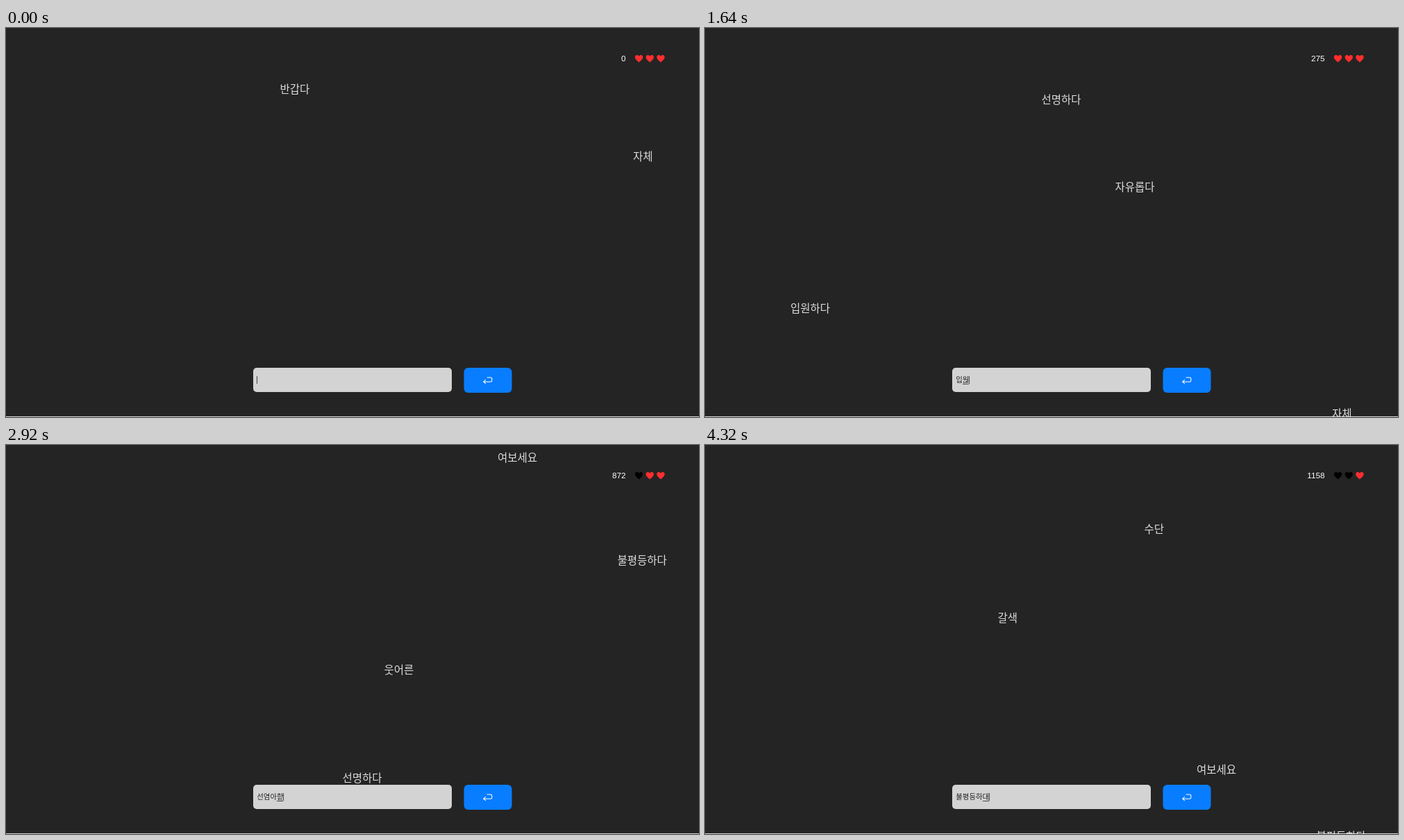
These frames come from a looping animation (998x561 px, 4340 ms). An HTML page with a canvas:

```html
<!DOCTYPE html>
<html lang="ko">
<head>
<meta charset="utf-8">
<title>Falling words</title>
<style>
html, body { margin: 0; width: 100%; height: 100%; overflow: hidden; background: #242424; }
canvas { display: block; width: 998px; height: 561px; }
</style>
</head>
<body>
<canvas id="stage"></canvas>
<script>
const W = 998, H = 561, LOOP = 4340;
const KOREAN = '"Noto Sans CJK KR", "Noto Sans CJK", "Noto Sans KR", sans-serif';
const canvas = document.getElementById('stage');
const ratio = window.devicePixelRatio || 1;
canvas.width = W * ratio;
canvas.height = H * ratio;
const ctx = canvas.getContext('2d');
ctx.scale(ratio, ratio);

// y is the middle of the word at time t, speed in px per ms
const words = [
  { text: '반갑다', x: 394.5, t: 0, y: 88, speed: 0.294, end: 1240 },
  { text: '자체', x: 903, t: 0, y: 185, speed: 0.2262 },
  { text: '입원하다', x: 123, t: 1000, y: 222, speed: 0.2844, end: 1820 },
  { text: '자유롭다', x: 590.5, t: 1000, y: 61, speed: 0.263, end: 2440 },
  { text: '선명하다', x: 484.5, t: 1640, y: 102.5, speed: 0.295 },
  { text: '웃어른', x: 544.5, t: 2360, y: 161, speed: 0.291, end: 3640 },
  { text: '불평등하다', x: 880.5, t: 2360, y: 7, speed: 0.284 },
  { text: '여보세요', x: 708, t: 2920, y: 18, speed: 0.3215 },
  { text: '갈색', x: 421.5, t: 3700, y: 82, speed: 0.2693 },
  { text: '수단', x: 632.5, t: 4320, y: 121, speed: 0.28 }
];

// each entry: first key, time per key, time of Enter, text after each key
const typing = [
  [840, 50, 1240, 'ㅂ 바 반 반ㄱ 반가 반갑 반갑ㄷ 반갑다'],
  [1285, 48, 1820, 'ㅇ 이 입 입ㅇ 입우 입워 입원 입웒 입원하 입원핟 입원하다'],
  [1990, 50, 2440, 'ㅈ 자 장 자유 자율 자유로 자유롭 자유롭ㄷ 자유롭다'],
  [2475, 43, 3000, 'ㅅ 서 선 선ㅇ 선여 선염 선염ㅇ 선염아 선염앟 선염아하 선염아핟 선염아하다'],
  [3220, 50, 3640, 'ㅇ 우 웃 웃ㅇ 웃어 웃얼 웃어르 웃어른'],
  [3750, 45, LOOP, 'ㅂ 부 불 붍 불펴 불평 불평ㄷ 불평드 불평등 불평등ㅎ 불평등하 불평등핟 불평등하대']
].map(([start, step, end, keys]) => ({ start, step, end, keys: keys.split(' ') }));

const scores = [[3640, 1158], [2440, 872], [1820, 572], [1240, 275], [0, 0]];
const losses = [1707, 3228];

function box(x, y, w, h, r, color) {
  ctx.fillStyle = color;
  ctx.beginPath();
  ctx.roundRect(x, y, w, h, r);
  ctx.fill();
}

function label(text, x, y, font, color, align = 'left') {
  ctx.font = font;
  ctx.fillStyle = color;
  ctx.textAlign = align;
  ctx.fillText(text, x, y);
}

function heart(x, y, color) {
  ctx.fillStyle = color;
  ctx.beginPath();
  ctx.moveTo(x, y + 5.4);
  for (const s of [-1, 1]) {
    ctx.moveTo(x, y + 5.4);
    ctx.bezierCurveTo(x + s * 3.2, y + 2.8, x + s * 5.7, y + 0.8, x + s * 5.7, y - 1.8);
    ctx.bezierCurveTo(x + s * 5.7, y - 5.4, x + s * 1.8, y - 6, x, y - 3.4);
    ctx.closePath();
  }
  ctx.fill();
}

function drawWords(t) {
  for (const w of words) {
    const y = w.y + (t - w.t) * w.speed;
    if (y < -12 || y > 572 || t >= w.end) continue;
    label(w.text, w.x, y + 6, '500 15.5px ' + KOREAN, '#dcdcdc');
  }
}

function drawStatus(t) {
  const score = scores.find(s => t >= s[0])[1];
  label(score, 892.5, 48, '11.7px "Liberation Sans", Arial, sans-serif', '#fff', 'right');
  const lost = losses.filter(at => t >= at).length;
  for (let i = 0; i < 3; i++) heart(911.5 + i * 15.7, 44, i < lost ? '#000' : '#ff2e2e');
}

function drawInput(t) {
  box(356, 490, 286, 35, 5, '#d3d3d3');
  const entry = typing.find(e => t >= e.start && t < e.end);
  let caret = 361;
  if (entry) {
    const key = Math.min(Math.floor((t - entry.start) / entry.step), entry.keys.length - 1);
    const text = entry.keys[key];
    label(text, 361.3, 511, '10.4px ' + KOREAN, '#222');
    caret = Math.round(361 + text.length * 9.57);
    ctx.fillRect(caret - 9, 513, 9, 0.8);
  }
  ctx.fillStyle = '#333';
  ctx.fillRect(caret, 502, 0.9, 11);
}

function drawButton() {
  box(659.5, 490, 69, 36, 6, '#087dff');
  ctx.strokeStyle = '#fff';
  ctx.lineWidth = 1.1;
  ctx.lineCap = ctx.lineJoin = 'round';
  ctx.stroke(new Path2D('M693 504H698Q699.8 504 699.8 505.8V508.4Q699.8 510.2 698 510.2H688M690.6 507.7L687.6 510.2L690.6 512.7'));
}

function draw(t) {
  ctx.fillStyle = '#242424';
  ctx.fillRect(0, 0, W, H);
  drawWords(t);
  ctx.fillStyle = '#fff';
  ctx.fillRect(0, 560.2, W, 0.8);
  drawStatus(t);
  drawInput(t);
  drawButton();
}

const begin = performance.now();
function tick() {
  const t = (performance.now() - begin) % LOOP;
  draw(Math.floor(t / 20) * 20);
  requestAnimationFrame(tick);
}
tick();
</script>
</body>
</html>
```
